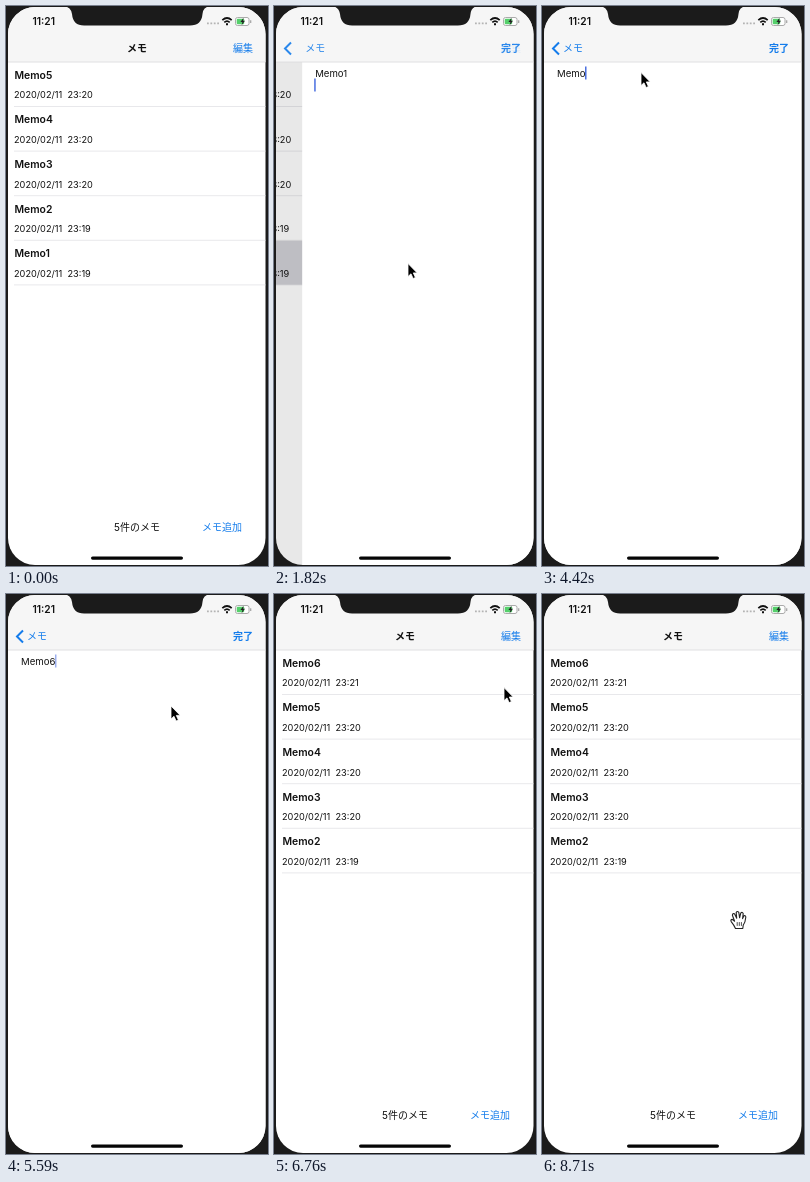
These frames come from a looping animation (262x560 px, 8840 ms). An HTML page:

```html
<!DOCTYPE html>
<html lang="ja">
<head>
<meta charset="utf-8">
<title>メモ</title>
<style>
html, body { margin: 0; width: 100%; height: 100%; overflow: hidden; background: #1b1b1b; }
svg { display: block; width: 262px; height: 560px; }
text { font: 10px Inter, "Noto Sans CJK JP", "Noto Sans CJK", sans-serif; fill: #111; white-space: pre; }
.bold { font-weight: 600; }
.name { font-size: 10.4px; font-weight: 600; }
.date { font-size: 9.2px; }
.blue { fill: #147ceb; }
.mid { text-anchor: middle; }
#note { font-size: 9.6px; }
</style>
</head>
<body>
<svg viewBox="0 0 262 560">
  <clipPath id="screen"><rect x="2" y="1" width="257.5" height="558" rx="27"/></clipPath>
  <rect width="262" height="560" fill="#1b1b1b"/>
  <g clip-path="url(#screen)">
    <rect width="262" height="560" fill="#fff"/>
    <g id="list">
      <rect id="picked" x="2" y="234.5" width="258" height="44.5" fill="#d1d1d6"/>
      <g id="before"></g>
      <g id="after"></g>
      <text class="mid" x="131" y="525">5件のメモ</text>
      <text class="blue" x="196" y="525">メモ追加</text>
    </g>
    <rect id="dim" width="262" height="560"/>
    <g id="detail">
      <rect x="2" y="56" width="260" height="504" fill="#fff"/>
      <text id="note" x="15" y="70.5"></text>
      <rect id="caret" width="1.5" height="13" fill="#4a6fe0"/>
    </g>
    <rect width="262" height="56" fill="#f6f6f6"/>
    <path d="M2 56H260" stroke="#d9d9db" stroke-width=".8"/>
    <g id="title">
      <text id="heading" class="bold" x="121" y="46">メモ</text>
      <text id="back" class="blue" x="121" y="46">メモ</text>
    </g>
    <path id="chevron" d="M17 36.5L11 42.5L17 48.5" fill="none" stroke="#147ceb" stroke-width="2"/>
    <text id="edit" class="blue" x="227" y="46">編集</text>
    <text id="done" class="blue bold" x="227" y="46">完了</text>

    <text class="bold" x="26.5" y="19" style="font-size:10.2px">11:21</text>
    <path d="M201 17.3H213" stroke="#b4b4b4" stroke-width="1.8" stroke-dasharray="1.8 1.6"/>
    <g fill="none" stroke="#111" stroke-width="1.7">
      <path d="M216.3 14.2Q221 9.8 225.7 14.2M218.3 16.4Q221 13.9 223.7 16.4"/>
      <path d="M220 18.2H222" stroke-width="2"/>
    </g>
    <rect x="229.5" y="11.5" width="13.5" height="8" rx="2" fill="#fff" stroke="#a2a2a2" stroke-width=".9"/>
    <rect x="230.7" y="12.7" width="7.5" height="5.6" rx="1" fill="#55cf6b"/>
    <path d="M237.6 11.8L234.4 16H236.4L235.6 19.2L239 14.8H237z" fill="#222"/>
    <path d="M244.7 14.2V17" stroke="#a2a2a2" stroke-width="1.2"/>
    <rect x="85" y="550.5" width="92" height="3.2" rx="1.6" fill="#050505"/>
  </g>
  <path d="M58 0Q65 1 66 8Q67 19.5 78 19.5H184Q195.5 19.5 196.5 8Q197 1 204 0Z" fill="#1b1b1b"/>
  <path id="arrow" d="M0 0V13L3 10.3L5.1 15L7.4 14L5.3 9.4H9.2Z" fill="#000" stroke="#fff" stroke-width=".8"/>
  <g id="hand" fill="#fff" stroke="#222" stroke-width="1.1" stroke-linejoin="round" stroke-linecap="round">
    <path d="M193.5 334.5Q192 331 189.2 327.6Q188.2 325.6 190.3 325.4L192.6 327.2L190.4 321.2Q190.6 319 192.5 319.8L194.7 324.3L194.2 318.6Q195.3 316.6 196.8 318.4L197.6 323.8L198.8 318.9Q200.5 317.6 201.2 319.6L200.6 324.6L202 321.8Q203.8 321.2 203.8 323.2Q203.4 328 201.2 331.2L200.8 334.5Z"/>
    <path d="M195.2 328.5V331.5M197.3 328.5V331.5M199.4 328.5V331.5" stroke-width=".8"/>
  </g>
</svg>
<script>
const LOOP = 8840, STEP = 130;
const PUSH = 1560, PUSH_TIME = 520, POP = 6630;
const WIDTH = 258;

// time, x, y of the pointer tip
const pointer = [
  [260, 240, 330], [390, 205, 305], [780, 136, 262], [1040, 134, 257.5],
  [2340, 134, 257.5], [2860, 99, 66.5], [5200, 99, 66.5], [5590, 165, 112],
  [5850, 245, 80], [6110, 241, 46], [6240, 238, 41], [6630, 238, 41],
  [7280, 198, 304], [7410, 195.5, 310]
];
// time, text
const typing = [[0, "Memo1\n"], [3120, "Memo1"], [3900, "Memo"], [4940, "Memo6"]];

const $ = id => document.getElementById(id);
const set = (id, attrs) => {
  for (const key in attrs) $(id).setAttribute(key, attrs[key]);
};
const show = (id, on) => set(id, { opacity: +on });
const clamp = v => Math.min(1, Math.max(0, v));

function fillList(id, newest) {
  let rows = "";
  for (let i = 0; i < 5; i++) {
    const n = newest - i, y = 56 + i * 44.6;
    const minute = n > 5 ? 21 : n > 2 ? 20 : 19;
    rows += `<text class="name" x="8.5" y="${y + 16.8}">Memo${n}</text>
      <text class="date" x="8" y="${y + 36.3}">2020/02/11  23:${minute}</text>
      <path d="M8 ${y + 44.5}H260" stroke="#e3e3e6" stroke-width=".8"/>`;
  }
  $(id).innerHTML = rows;
}

function pointerAt(t) {
  const i = pointer.findIndex(k => k[0] > t);
  if (i < 0) return pointer[pointer.length - 1].slice(1);
  if (i === 0) return pointer[0].slice(1);
  const [a, b] = [pointer[i - 1], pointer[i]];
  const f = (t - a[0]) / (b[0] - a[0]);
  return [1, 2].map(k => a[k] + (b[k] - a[k]) * f);
}

function drawNote(t) {
  const [since, value] = typing.filter(k => k[0] <= t).pop();
  const newline = value.endsWith("\n");
  $("note").textContent = value.trim();
  const phase = (t - Math.max(since, PUSH)) % 1040;
  // visible most of each second, with short fades
  const alpha = phase < 600 ? 1 : clamp(Math.abs(phase - 820) / 110 - 1);
  set("caret", {
    x: newline ? 14 : 14.6 + $("note").getComputedTextLength(),
    y: newline ? 72.5 : 60.5,
    opacity: t >= 4290 && t < 4680 || t >= 6240 ? 1 : alpha
  });
}

function draw(t) {
  const open = t < POP ? 1 - (1 - clamp((t - PUSH) / PUSH_TIME)) ** 3.3 : 0;
  const saved = t >= POP;

  set("list", { transform: `translate(${-0.3 * WIDTH * open})` });
  set("detail", { transform: `translate(${WIDTH * (1 - open)})` });
  set("dim", { opacity: 0.1 * open });
  show("picked", t >= PUSH && !saved);
  show("before", !saved);
  show("after", saved);

  set("title", { transform: `translate(${-100 * open})` });
  set("heading", { opacity: clamp(1 - open * 1.1) });
  set("back", { opacity: open });
  set("chevron", { opacity: open });
  set("edit", { opacity: 1 - open });
  set("done", { opacity: t >= 6500 ? 0.25 * open : open });
  drawNote(t);

  const [x, y] = pointerAt(t), grab = t >= 8450;
  set("arrow", { transform: `translate(${x} ${y})` });
  show("arrow", t >= 260 && !grab);
  show("hand", grab);
}

function tick() {
  const t = performance.now() % LOOP;
  draw(Math.floor(t / STEP) * STEP);
  requestAnimationFrame(tick);
}

fillList("before", 5);
fillList("after", 6);
tick();
</script>
</body>
</html>
```
